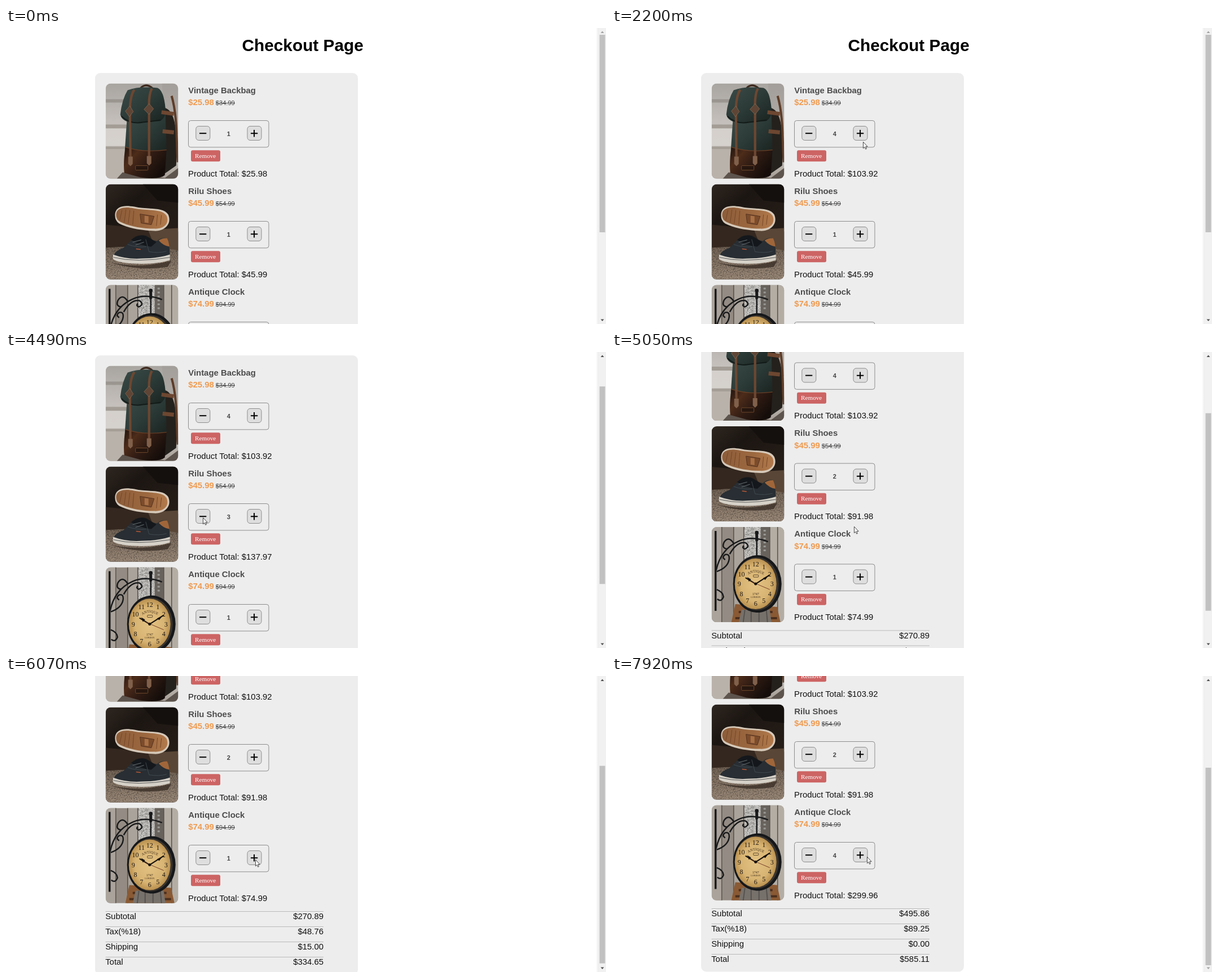
Animation of 1064 by 526 pixels, one loop 7.99 s. Source, as an HTML page:

```html
<!DOCTYPE html>
<html lang="en">
<head>
<meta charset="utf-8">
<title>Checkout Page</title>
<style>
  html, body { margin: 0; width: 100%; height: 100%; overflow: hidden; background: #fff; }
  svg { display: block; }
  text { font: 14.88px "Liberation Sans", Arial, sans-serif; fill: #111; }
  .heading { font-size: 29.8px; font-weight: bold; fill: #000; }
  .name { font-weight: bold; fill: #4c4c4c; }
  .price { font-weight: bold; fill: #f09b50; }
  .old { font-size: 11.1px; fill: #444; }
  .qty { font-size: 11px; font-weight: bold; fill: #444; text-anchor: middle; }
  .remove { font: 11.2px "Liberation Serif", "Times New Roman", serif; fill: #fff; }
  .amount { text-anchor: end; }
  .dial { font: 12px "Liberation Serif", serif; fill: #241b12; text-anchor: middle; }
  .tiny { font: 4.6px "Liberation Serif", serif; fill: #3b2a18; text-anchor: middle; }
</style>
</head>
<body>
<svg id="stage" width="1064" height="526" viewBox="0 0 1064 526">
  <defs>
    <clipPath id="frame"><rect width="128.5" height="169.3" rx="9"/></clipPath>
    <filter id="grain" x="0" y="0" width="1" height="1">
      <feTurbulence type="fractalNoise" baseFrequency=".55" numOctaves="2" seed="4"/>
      <feColorMatrix values="0 0 0 0 0  0 0 0 0 0  0 0 0 0 0  1.6 0 0 0 -.55"/>
      <feComposite in2="SourceGraphic" operator="in"/>
      <feMerge><feMergeNode in="SourceGraphic"/><feMergeNode/></feMerge>
    </filter>
    <linearGradient id="stairs" x2="0" y2="1">
      <stop offset="0" stop-color="#a8a49f"/><stop offset=".4" stop-color="#c4bfba"/>
      <stop offset=".75" stop-color="#c9c4be"/><stop offset="1" stop-color="#a59d95"/>
    </linearGradient>
    <linearGradient id="cloth" x2="1" y2="1">
      <stop offset="0" stop-color="#3b4b48"/><stop offset=".5" stop-color="#2c3b38"/><stop offset="1" stop-color="#19221f"/>
    </linearGradient>
    <linearGradient id="leather" x2="1" y2=".6">
      <stop offset="0" stop-color="#20130e"/><stop offset=".3" stop-color="#4d2c1a"/>
      <stop offset=".6" stop-color="#2f1b13"/><stop offset="1" stop-color="#150d0a"/>
    </linearGradient>
    <linearGradient id="dusk" x2=".7" y2="1">
      <stop offset="0" stop-color="#2e2620"/><stop offset=".3" stop-color="#1c1612"/><stop offset="1" stop-color="#2a201a"/>
    </linearGradient>
    <linearGradient id="carpet" x2="0" y2="1">
      <stop offset="0" stop-color="#77685a"/><stop offset="1" stop-color="#a39180"/>
    </linearGradient>
    <linearGradient id="sole" x2="1">
      <stop offset="0" stop-color="#8d5d3a"/><stop offset=".6" stop-color="#9c683f"/><stop offset="1" stop-color="#b27a4c"/>
    </linearGradient>
    <radialGradient id="face">
      <stop offset="0" stop-color="#e3c283"/><stop offset=".7" stop-color="#d8b473"/><stop offset="1" stop-color="#ba9150"/>
    </radialGradient>
    <linearGradient id="edge"><stop offset="0" stop-color="#fff"/><stop offset="1" stop-color="#ececec"/></linearGradient>

    <g id="backpack">
      <rect width="129" height="169" fill="url(#stairs)"/>
      <path d="M0 28H33V34H0Z" fill="#827c76" opacity=".5"/>
      <path d="M0 73H38V80H0ZM0 112H38V117H0Z" fill="#8e867e" opacity=".6"/>
      <path d="M0 80H38V111H0Z" fill="#dcd8d3" opacity=".7"/>
      <path d="M0 117H36V169H0Z" fill="#b9b2aa"/>
      <path d="M100 0H129V90H105Z" fill="#a09b96" opacity=".6"/>
      <path d="M30 158L105 168L129 150V169H20Z" fill="#5d544d"/>
      <path d="M61 17C59 1 77 0 84 10" fill="none" stroke="#3d291e" stroke-width="3.5"/>
      <path d="M101 43C126 43 128 95 125 146L105 160Z" fill="#24211d"/>
      <path d="M117 22C128 60 125 105 128 140" fill="none" stroke="#5f3d28" stroke-width="4"/>
      <path d="M38 60L106 55L108 125L34 119Z" fill="url(#cloth)"/>
      <path d="M35 113Q65 123 108 118L105 163Q96 171 62 167L33 159Q31 139 35 113Z" fill="url(#leather)"/>
      <path d="M35 113Q65 123 108 118" fill="none" stroke="#6a4027" stroke-width="1.2"/>
      <path d="M39 12Q60 4 92 8Q103 12 106 44Q108 61 96 67L47 70Q28 67 26 55Q29 28 39 12Z" fill="url(#cloth)"/>
      <path d="M28 58Q43 73 66 69L98 65" fill="none" stroke="#131b19" stroke-width="2"/>
      <g fill="none" stroke="#6d4731" stroke-width="4.2">
        <path d="M51 11Q44 20 43 45L44 140M82 9Q76 20 77 45L77 140"/>
        <path d="M99 51L121 54M101 85L121 87" stroke-width="7"/>
      </g>
      <path d="M43 40L49 50L42 59L35 49ZM77 36L85 45L77 55L68 46Z" fill="#5e4535" stroke="#8f705a" stroke-width=".7"/>
      <path d="M40 130H48V143L44 147L40 143ZM73 129H81V142L77 146L73 142Z" fill="#80604a"/>
      <rect x="53" y="146" width="22" height="8" rx="1" fill="#26160f" stroke="#6f482c"/>
    </g>

    <g id="shoes">
      <rect width="129" height="169" fill="url(#dusk)"/>
      <path d="M66 0H129V33L92 29Z" fill="#14100e"/>
      <path d="M0 72L129 84V120H0Z" fill="#33271f"/>
      <path d="M75 81L129 78V118H90Z" fill="#594636"/>
      <path d="M0 113Q70 107 129 118V169H0Z" fill="url(#carpet)" filter="url(#grain)"/>
      <path d="M8 139Q63 151 117 136L110 147Q55 155 8 139Z" fill="#3b3027" opacity=".8"/>
      <path d="M17 51C20 38 35 37 51 40C76 46 102 39 111 54C118 70 105 84 86 83C61 82 39 78 24 70Q15 64 17 51Z" fill="#d5c8b8"/>
      <path d="M19 51C22 41 36 40 50 43C76 48 100 43 108 56C114 70 103 80 86 79C62 79 40 74 26 67Q17 62 19 51Z" fill="url(#sole)"/>
      <path d="M61 53L86 57L81 72L63 69Z" fill="#7b4c2c" stroke="#56331f"/>
      <path d="M69 56L76 57V69L69 68Z" fill="#a87146"/>
      <path d="M29 46L25 64M36 45L33 68M43 46L40 70M50 47L48 72M92 54L90 74M99 55L97 72" stroke="#754728" stroke-width="1"/>
      <path d="M14 128Q15 119 32 113L44 101Q53 91 71 97L91 101Q98 94 109 96Q114 106 114 134Q63 143 14 128Z" fill="#282e33"/>
      <path d="M45 99Q58 87 72 92L90 103L81 111Q61 109 45 99Z" fill="#14181c"/>
      <path d="M94 100Q101 95 109 96Q112 102 113 111Q103 110 94 100Z" fill="#a0663a"/>
      <path d="M39 107Q56 113 72 111M71 98L77 120Q95 123 108 119" fill="none" stroke="#4a5359" stroke-width=".8"/>
      <path d="M48 103L63 99M53 108L68 103" stroke="#697174"/>
      <path d="M54 115L62 116" stroke="#bc5834" stroke-width="1.5"/>
      <path d="M13 125Q37 134 65 132Q93 132 114 125V135Q88 143 48 141Q20 139 13 133Z" fill="#d6d1c8"/>
      <path d="M14 130Q55 140 114 130" fill="none" stroke="#4a4b4b" stroke-width=".9"/>
    </g>

    <g id="clock">
      <rect width="129" height="169" fill="#948c84"/>
      <path d="M0 0H18V169H0ZM40 0H57V169H40Z" fill="#aaa39b"/>
      <path d="M58 0H87V130H58Z" fill="#d3d1ce" filter="url(#grain)"/>
      <path d="M87 0H103V130H87Z" fill="#68625c"/>
      <path d="M104 0H129V169H104Z" fill="#b3ada4"/>
      <path d="M18 0V169M39 0V169M57 0V130M103 0V169M117 0V169" stroke="#5a544e" stroke-width="1.6"/>
      <path d="M65 5V45M72 2V50M94 5V46" stroke="#999894" stroke-width="4" stroke-dasharray="3 4"/>
      <path d="M42 137L116 142L122 169H35Z" fill="#8a5a34"/>
      <path d="M48 151H108M42 162H116" stroke="#4c2f1d" stroke-width="4"/>
      <path d="M53 147H103L106 169H48Z" fill="#77716b"/>
      <path d="M59 147L56 169M70 147V169M84 147V169M97 147L99 169" stroke="#56524e" stroke-width="2"/>
      <g fill="none" stroke="#191a1b" stroke-width="2.5">
        <path d="M7 7V149" stroke-width="3.5"/>
        <path d="M8 77Q16 39 48 25Q71 15 100 26M9 79Q29 72 31 57Q32 47 24 49Q17 54 24 58M32 48Q45 25 60 28Q69 34 59 39Q53 37 57 33M9 111Q20 115 21 124Q17 134 10 128M80 8V55M39 29Q30 15 22 27Q17 38 28 39"/>
        <path d="M80 12V25" stroke-width="5"/>
      </g>
      <circle cx="80" cy="10" r="3.4" fill="#171819"/>
      <ellipse cx="81" cy="101" rx="43" ry="51" fill="#151719"/>
      <ellipse cx="80" cy="101" rx="39" ry="47" fill="#3a342e"/>
      <ellipse cx="78" cy="101" rx="37" ry="45" fill="url(#face)"/>
      <g id="dial"></g>
      <path id="arc" d="M61 88Q78 73 96 88" fill="none"/>
      <text class="tiny" style="font-size:6.5px"><textPath href="#arc" startOffset="50%">ANTIQUE</textPath></text>
      <rect x="74" y="85" width="9" height="4" rx="1" fill="none" stroke="#3b2a18" stroke-width=".8"/>
      <text class="tiny" x="78" y="121" style="font-size:6px">1747</text>
      <text class="tiny" x="78" y="126" style="font-size:4px">LONDON</text>
      <path d="M78 101L60 90M78 101L103 85" stroke="#17120e" stroke-width="2.2"/>
      <path d="M63 89L70 93L66 97ZM91 91L101 86L95 94Z" fill="#17120e"/>
      <path d="M70 97L103 111" stroke="#6b3121" stroke-width=".9"/>
      <circle cx="78" cy="101" r="2.5" fill="#17120e"/>
    </g>
  </defs>

  <g id="page">
    <text class="heading" x="418.5" y="41">Checkout Page</text>
    <rect x="158" y="80" width="466" height="672.5" rx="9" fill="#ededed"/>
    <g id="items"></g>
    <g id="summary"></g>
  </g>

  <rect x="1046" width="5" height="526" fill="url(#edge)"/>
  <rect x="1051" width="13" height="526" fill="#f1f1f1"/>
  <path id="up" d="M1054.5 9L1057.5 5.5L1060.5 9Z"/>
  <path id="down" d="M1054.5 517.5L1057.5 521L1060.5 517.5Z"/>
  <rect id="thumb" x="1052.5" y="12" width="10" height="351" fill="#c1c1c1"/>
  <path id="cursor" d="M.5 .5V11.8L3 9.5L4.7 13.3L6.4 12.6L4.8 8.8H8.2Z" fill="#fff" stroke="#333" stroke-width=".9"/>
</svg>
<script>
const $ = id => document.getElementById(id);
const LOOP = 7990;
const MAX_SCROLL = 227;

// Quantity changes are [time, quantity].
const products = [
  { name: 'Vintage Backbag', art: 'backpack', price: 25.98, old: 34.99, qty: [[0, 1], [900, 2], [1300, 3], [1620, 4]] },
  { name: 'Rilu Shoes', art: 'shoes', price: 45.99, old: 54.99, qty: [[0, 1], [3140, 2], [3380, 3], [3690, 4], [4420, 3], [4730, 2]] },
  { name: 'Antique Clock', art: 'clock', price: 74.99, old: 94.99, qty: [[0, 1], [6160, 2], [6550, 3], [6960, 4]] }
];
// Scroll keys are [time, offset]; cursor keys are [time, x, y].
const scrollKeys = [[0, 0], [2210, 0], [2270, 22], [2350, 58], [2430, 74], [4860, 74], [4970, 122], [5050, 145.5],
  [5120, 148], [5270, 148], [5360, 178], [5440, 211], [5520, 222], [7770, 222], [7830, 225], [7920, MAX_SCROLL]];
const cursorKeys = [[100, 635, 19], [650, 442, 189], [1890, 442, 189], [2200, 445, 202], [2430, 445, 204],
  [2520, 445, 204], [2970, 446, 293], [3790, 446, 294], [4050, 400, 301], [4250, 349, 294], [4740, 349, 294],
  [5050, 429, 310], [5520, 440, 221], [6000, 442, 326], [6980, 442, 326], [7750, 452, 321]];

const money = v => '$' + v.toFixed(2);
const button = (x, icon) => `<rect x="${x}" y="75.9" width="25" height="25" rx="5" fill="#dedede" stroke="#8c8c8c"/>
  <path d="${icon}" stroke="#000" stroke-width="2"/>`;

$('dial').innerHTML = Array.from({ length: 12 }, (_, i) => {
  const a = (i + 1) * Math.PI / 6;
  return `<text class="dial" x="${78 + 29 * Math.sin(a)}" y="${105 - 35 * Math.cos(a)}">${i + 1}</text>`;
}).join('');

$('items').innerHTML = products.map((p, i) => `
  <g transform="translate(0 ${98.6 + i * 179})">
    <g transform="translate(176.7 0)" clip-path="url(#frame)"><use href="#${p.art}"/></g>
    <text class="name" x="323.3" y="17.4">${p.name}</text>
    <text class="price" x="323.3" y="38.9">${money(p.price)}</text>
    <text class="old" x="371.8" y="38.9">${money(p.old)}</text>
    <path d="M372 34.9H406" stroke="#444"/>
    <rect x="323.5" y="65.9" width="142.5" height="47.4" rx="4" fill="none" stroke="#8c8c8c"/>
    ${button(336.8, 'M343 88.6H355.3')}
    ${button(428, 'M434 88.6H446.3M440.1 82.4V94.8')}
    <text class="qty" x="394.8" y="93.4" id="qty${i}"></text>
    <rect x="328" y="118.6" width="52" height="20" rx="3" fill="#cd6464"/>
    <text class="remove" x="335" y="132.2">Remove</text>
    <text x="323" y="165.2" id="total${i}"></text>
  </g>`).join('');

$('summary').innerHTML = ['Subtotal', 'Tax(%18)', 'Shipping', 'Total'].map((label, i) => `
  <g transform="translate(0 ${640.5 + i * 27})">
    <path d="M176.5 0H563" stroke="#b9b9b9"/>
    <text x="176.2" y="13.7">${label}</text>
    <text class="amount" x="563" y="13.7" id="sum${i}"></text>
  </g>`).join('');

const latest = (keys, t) => keys.filter(k => k[0] <= t).pop()[1];

function between(keys, t) {
  const n = keys.findIndex(k => k[0] > t);
  if (n < 0) return keys[keys.length - 1].slice(1);
  if (n === 0) return keys[0].slice(1);
  const a = keys[n - 1], b = keys[n], f = (t - a[0]) / (b[0] - a[0]);
  return a.slice(1).map((v, i) => v + (b[i + 1] - v) * f);
}

function setText(id, value) {
  if ($(id).textContent !== value) $(id).textContent = value;
}

function draw(t) {
  let subtotal = 0;
  products.forEach((p, i) => {
    const qty = latest(p.qty, t);
    subtotal += qty * p.price;
    setText('qty' + i, String(qty));
    setText('total' + i, 'Product Total: ' + money(qty * p.price));
  });
  const tax = subtotal * 0.18;
  const shipping = subtotal > 300 ? 0 : 15;
  [subtotal, tax, shipping, subtotal + tax + shipping].forEach((v, i) => setText('sum' + i, money(v)));

  const [scroll] = between(scrollKeys, t);
  $('page').setAttribute('transform', `translate(0 ${-scroll})`);
  $('thumb').setAttribute('y', 12 + scroll * 0.665);
  $('up').setAttribute('fill', scroll > 0 ? '#505050' : '#a3a3a3');
  $('down').setAttribute('fill', scroll < MAX_SCROLL ? '#505050' : '#a3a3a3');

  const [x, y] = between(cursorKeys, t);
  $('cursor').setAttribute('transform', `translate(${x} ${y})`);
  $('cursor').setAttribute('visibility', t < 100 ? 'hidden' : 'visible');
}

const start = performance.now();
function tick() {
  draw((performance.now() - start) % LOOP);
  requestAnimationFrame(tick);
}
tick();
</script>
</body>
</html>
```
